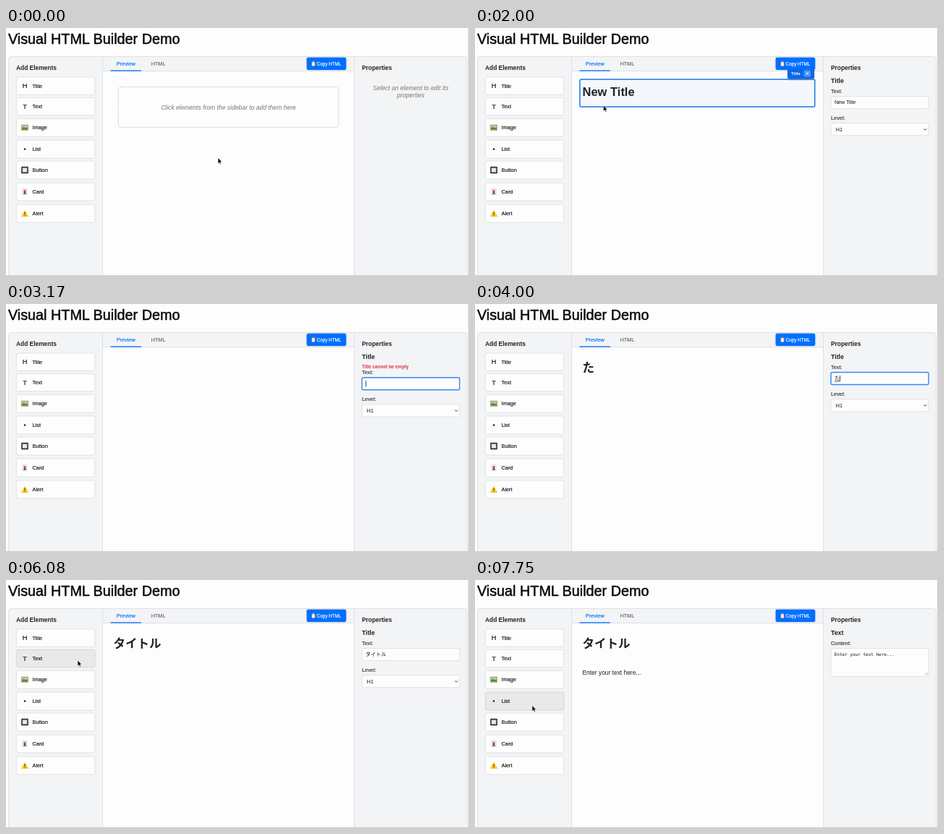
An HTML page for the animation above (8000 ms loop, 640 by 343 pixels).

```html
<!DOCTYPE html>
<html lang="en">
<head>
<meta charset="utf-8">
<title>Visual HTML Builder Demo</title>
<style>
  html, body { margin: 0; width: 100%; height: 100%; overflow: hidden; background: #fdfdfd; }
  svg { display: block; width: 640px; height: 343px; }
  text { font-family: "Liberation Sans", Arial, "Noto Sans CJK JP", "Noto Sans CJK", sans-serif; white-space: pre; }
  .bold { font-weight: 700; }
  .medium { stroke-width: .16px; stroke: currentColor; }
  .italic { font-style: italic; }
  .mono { font-family: "DejaVu Sans Mono", monospace; }
</style>
</head>
<body>
<svg id="stage" viewBox="0 0 640 343"></svg>
<script>
const NS = 'http://www.w3.org/2000/svg';
const LOOP = 8000, STEP = 1000 / 12, FADE = 200;
const BLUE = '#006fff', PAGE = '#fdfdfd', PANEL = '#f3f4f6', LINE = '#d9dce0', INK = '#222';
const stage = document.getElementById('stage');

function add(parent, tag, attrs, content) {
  const node = document.createElementNS(NS, tag);
  for (const key in attrs) node.setAttribute(key, attrs[key]);
  if (content !== undefined) node.textContent = content;
  parent.appendChild(node);
  return node;
}
const group = (parent, attrs = {}) => add(parent, 'g', attrs);
const rect = (parent, x, y, width, height, fill, more = {}) =>
  add(parent, 'rect', { x, y, width, height, fill, ...more });
const path = (parent, d, fill, more = {}) => add(parent, 'path', { d, fill, ...more });
const text = (parent, x, y, size, content, fill = INK, cls = '', more = {}) =>
  add(parent, 'text', { x, y, 'font-size': size, fill, color: fill, class: cls, ...more }, content);
const show = (node, on) => node.setAttribute('display', on ? 'inline' : 'none');
const field = (parent, y, height) =>
  rect(parent, 492, y, 135, height, PAGE, { rx: 2, stroke: LINE, 'stroke-width': .8 });

// Page frame
rect(stage, 0, 0, 640, 343, PAGE);
text(stage, 3, 22, 19.8, 'Visual HTML Builder Demo', '#0a0a0a', '', { stroke: '#0a0a0a', 'stroke-width': .5 });
rect(stage, 3.5, 39.5, 634, 320, PANEL, { rx: 4, stroke: LINE, 'stroke-width': .8 });
rect(stage, 134, 60, 347, 283, PAGE);
path(stage, 'M133.5 40V343M481.5 40V343M134 59.5H481', 'none', { stroke: LINE, 'stroke-width': .8 });

// Sidebar
text(stage, 14, 58.3, 8.4, 'Add Elements', INK, 'bold');
const icons = {
  Title: g => text(g, 26, 3.3, 9.2, 'H', '#111', 'medium', { 'text-anchor': 'middle' }),
  Text: g => text(g, 26, 3.3, 9.2, 'T', '#111', 'medium', { 'text-anchor': 'middle' }),
  Image: g => {
    rect(g, 21, -4, 10, 8, '#c99a4a', { rx: .6 });
    rect(g, 22.2, -2.8, 7.6, 5.6, '#8fc9ea');
    path(g, 'M22.2 2.8V.8L24.6-1L26.6.6L28-.2L29.8 1V2.8Z', '#4c8a3c');
    add(g, 'circle', { cx: 28, cy: -1.5, r: .8, fill: '#f6d94c' });
  },
  List: g => add(g, 'circle', { cx: 26, cy: 0, r: 1.2, fill: '#111' }),
  Button: g => {
    rect(g, 21.2, -4.7, 9.6, 9.4, '#2b2b2b', { rx: .8 });
    rect(g, 22.9, -3, 6.2, 6, '#e9e9e9', { stroke: '#8b8b8b', 'stroke-width': .5 });
  },
  Card: g => {
    rect(g, 22.8, -4.4, 6.4, 8.8, '#f7f5ee', { rx: .8, stroke: '#b5b5b5', 'stroke-width': .4 });
    path(g, 'M24.3-1.6L25.2-3L26-1.8L27-3L27.7-1.4L27.2.4H24.8Z', '#c0433f');
    path(g, 'M24.8.4H27.2L27.9 3.2H24.1Z', '#41547c');
  },
  Alert: g => {
    path(g, 'M26-4L30.6 4H21.4Z', '#fbc92e', { stroke: '#fbc92e', 'stroke-width': 1, 'stroke-linejoin': 'round' });
    path(g, 'M26-1.8V1.3M26 2.4V3.4', 'none', { stroke: '#222', 'stroke-width': 1 });
  }
};
const tops = [68, 96.5, 125.3, 155, 184, 214, 244];
const buttons = Object.keys(icons).map((name, i) => {
  const y = tops[i], height = i < 2 ? 24.3 : 25;
  const box = rect(stage, 14.3, y, 108.6, height, PAGE, { rx: 2.6, stroke: LINE, 'stroke-width': .8 });
  icons[name](group(stage, { transform: `translate(0 ${y + height / 2})` }));
  text(stage, 36.5, y + height / 2 + 2.4, 7.35, name, '#111', 'medium');
  return { box, area: [14, y, 109, height] };
});

// Preview
const hint = group(stage);
rect(hint, 155.3, 81.3, 304.5, 56, 'none', { rx: 3, stroke: '#c3c6ca', 'stroke-width': 1, 'stroke-dasharray': '2 1.4' });
text(hint, 307.5, 112.5, 8.55, 'Click elements from the sidebar to add them here', '#777', 'italic', { 'text-anchor': 'middle' });

const clip = add(stage, 'clipPath', { id: 'view' });
rect(clip, 134, 58, 347, 285, '#000');
const preview = group(stage, { 'clip-path': 'url(#view)' });

function block(name, y, height, baseline, size, content, cls) {
  const node = group(preview);
  const frame = rect(node, 145, y, 324.7, height, '#f4f8fd', { rx: 2, stroke: '#1a76ee', 'stroke-width': 1.5 });
  const label = text(node, 148.5, baseline, size, content, INK, cls);
  const tools = group(node);
  rect(tools, 432, y - 15.5, 37, 14.5, '#0b68e8', { rx: 2, style: 'filter:drop-shadow(0 1px 1.5px #0004)' });
  text(tools, 437, y - 6.2, 6.2, name, '#fff', 'bold');
  rect(tools, 454.5, y - 13, 9.5, 9.5, '#4b95f6', { rx: 1.5 });
  path(tools, `M457.7 ${y - 9.8}l3.2 3.2m0-3.2l-3.2 3.2`, 'none', { stroke: '#fff', 'stroke-width': 1 });
  return { node, frame, label, tools, area: [145, y, 325, height] };
}
const title = block('Title', 71, 38, 93.7, 16.5, '', 'bold');
const para = block('Text', 118.3, 24.6, 130.6, 8.42, 'Enter your text here...', '');

// Tabs and copy button
text(stage, 152.7, 51.5, 7.35, 'Preview', BLUE, 'medium');
text(stage, 200.5, 51.5, 7.35, 'HTML', '#666', 'medium');
rect(stage, 144.5, 58.4, 42.5, 1.3, BLUE);
rect(stage, 415.6, 40.8, 54.6, 17.2, BLUE, { rx: 2.2, style: 'filter:drop-shadow(0 .8px 1px #0003)' });
rect(stage, 422.4, 46.4, 5, 6.4, '#c58a55', { rx: .6 });
rect(stage, 423.1, 47.3, 3.6, 5, '#f3f3f3');
rect(stage, 423.8, 45.8, 2.2, 1.4, '#9aa0a8');
text(stage, 429.6, 51.7, 6.3, 'Copy HTML', '#fff', 'medium');

// Properties
text(stage, 492, 58.3, 8.4, 'Properties', INK, 'bold');
const noSelection = group(stage);
['Select an element to edit its', 'properties'].forEach((line, i) =>
  text(noSelection, 559.5, 86.3 + i * 9.6, 8.5, line, '#777', 'italic', { 'text-anchor': 'middle' }));
const heading = text(stage, 492, 75.8, 8.8, '', INK, 'bold');

const titleForm = group(stage);
const error = text(titleForm, 492, 88.9, 6.3, 'Title cannot be empty', '#d93848', 'bold');
const fields = group(titleForm);
text(fields, 492, 90, 7.35, 'Text:', '#333', 'medium');
const input = field(fields, 94.5, 17);
const marked = rect(fields, 497, 98.3, 29.5, 9, '#b3d7ff');
const value = text(fields, 497, 105.4, 7.1, '', '#111');
const composing = rect(fields, 497, 106.6, 0, .8, '#333');
const caret = rect(fields, 497, 98.7, .8, 8.4, '#222');
text(fields, 492, 127, 7.35, 'Level:', '#333', 'medium');
field(fields, 131.5, 17.3);
text(fields, 498.7, 142.9, 7.2, 'H1', '#111');
path(fields, 'M620.6 139.3l1.8 1.9l1.8-1.9', 'none', { stroke: '#333', 'stroke-width': 1 });

const textForm = group(stage);
text(textForm, 492, 90, 7.35, 'Content:', '#333', 'medium');
field(textForm, 94.5, 39);
text(textForm, 496.7, 105, 6, 'Enter your text here...', '#111', 'mono');
path(textForm, 'M621.7 131.7l4-4M624 131.7l1.7-1.7', 'none', { stroke: '#888', 'stroke-width': .6 });

path(stage, 'M639.5 0V343M0 342.5H640', 'none', { stroke: '#c8c9cb', 'stroke-width': 1 });

// Pointer
const pointer = group(stage);
const arrow = path(pointer, 'M0 0V8.2L1.9 6.5L3.1 9.3L4.4 8.7L3.2 6H5.7Z', '#000',
  { stroke: '#fff', 'stroke-width': .6, 'stroke-linejoin': 'round' });
const beam = path(pointer, 'M-1.5-4Q0-4 0-3Q0-4 1.5-4M0-3V3M-1.5 4Q0 4 0 3Q0 4 1.5 4', 'none',
  { stroke: '#222', 'stroke-width': .8 });

// Timeline: pointer [ms, x, y] and title text [ms, value]
const route = [
  [0, 293, 179.5], [170, 293, 179.5], [250, 240, 148], [330, 165, 100], [420, 125, 82], [540, 124, 81],
  [750, 98, 80], [1420, 95, 82], [1520, 98, 83], [1760, 156, 97], [2000, 177.5, 107], [2170, 179, 107],
  [2550, 526, 103], [5400, 522, 103], [5840, 104, 109], [6080, 99, 111], [6330, 99, 111],
  [6650, 160, 127], [6850, 175, 130], [6960, 150, 131], [7080, 90, 134], [7200, 88, 137],
  [7500, 83, 162], [7740, 79, 173.5], [8000, 79, 173.5]
];
const typed = [
  [0, ''], [1410, 'New Title'], [3000, ''], [3910, 'ｔ'], [4000, 'た'], [4160, 'たい'], [4330, 'たいｔ'],
  [4410, 'たいと'], [4500, 'たいとｒ'], [4580, 'たいとる'], [4750, 'タイトル']
];
const ADDED = 1410, CLEARED = 3000, FIRST_KEY = 3910, ACCEPTED = 4995, BLUR = 5995, TEXT_ADDED = 6160;
const during = (t, from, to) => t >= from && t < to;
const hidden = t => during(t, CLEARED, 5410);

function pointAt(t) {
  const i = Math.max(1, route.findIndex(p => p[0] >= t));
  const [t0, x0, y0] = route[i - 1], [t1, x1, y1] = route[i];
  const k = Math.min(1, Math.max(0, (t - t0) / (t1 - t0)));
  return [x0 + (x1 - x0) * k, y0 + (y1 - y0) * k];
}
function over([ax, ay, w, h], t) {
  const [x, y] = pointAt(t);
  return !hidden(t) && x >= ax && x <= ax + w && y >= ay && y <= ay + h;
}
// Share of the last FADE ms spent hovering, so the look depends on time alone
function hover(area, t, since = 0) {
  let hits = 0;
  for (let i = 0; i < 20; i++) {
    const past = t - i * FADE / 20;
    if (past >= since && over(area, past)) hits++;
  }
  return hits / 20;
}

function drawBlock(b, t, since) {
  show(b.node, t >= since);
  b.frame.setAttribute('opacity', hover(b.area, t, since));
  show(b.tools, over(b.area, t));
}

function draw(t) {
  const content = typed.filter(step => step[0] <= t).pop()[1];
  const invalid = during(t, CLEARED, FIRST_KEY);
  const focused = during(t, 2580, BLUR);

  for (const { box, area } of buttons) {
    const k = hover(area, t);
    box.setAttribute('fill', `rgb(${253 - 20 * k},${253 - 20 * k},${253 - 19 * k})`);
    box.setAttribute('stroke', k > .5 ? '#cfd2d6' : LINE);
  }

  show(hint, t < ADDED);
  title.label.textContent = content;
  drawBlock(title, t, ADDED);
  drawBlock(para, t, TEXT_ADDED);

  show(noSelection, t < ADDED);
  heading.textContent = t < ADDED ? '' : t < TEXT_ADDED ? 'Title' : 'Text';
  show(titleForm, during(t, ADDED, TEXT_ADDED));
  show(textForm, t >= TEXT_ADDED);

  show(error, invalid);
  fields.setAttribute('transform', `translate(0 ${invalid ? 7.3 : 0})`);
  value.textContent = content;
  input.setAttribute('stroke', focused ? '#3489f4' : LINE);
  input.setAttribute('stroke-width', focused ? 1.4 : .8);
  show(marked, during(t, 2740, CLEARED));
  const width = content && t < BLUR ? value.getComputedTextLength() : 0;
  show(composing, during(t, FIRST_KEY, ACCEPTED));
  composing.setAttribute('width', width);
  caret.setAttribute('x', 497 + width);
  const blinkOn = during(t, FIRST_KEY, ACCEPTED) || (t - CLEARED + 5) % 1000 < 500;
  show(caret, focused && !during(t, 2740, CLEARED) && blinkOn);

  const [x, y] = pointAt(t);
  const inField = x > 492 && x < 627 && during(t, ADDED, TEXT_ADDED);
  show(pointer, !hidden(t));
  show(arrow, !inField);
  show(beam, inField);
  pointer.setAttribute('transform', `translate(${x} ${y})`);
}

const start = performance.now();
function tick() {
  const t = (performance.now() - start) % LOOP;
  draw(Math.floor((t + 5) / STEP) * STEP % LOOP);
  requestAnimationFrame(tick);
}
draw(0);
requestAnimationFrame(tick);
</script>
</body>
</html>
```
